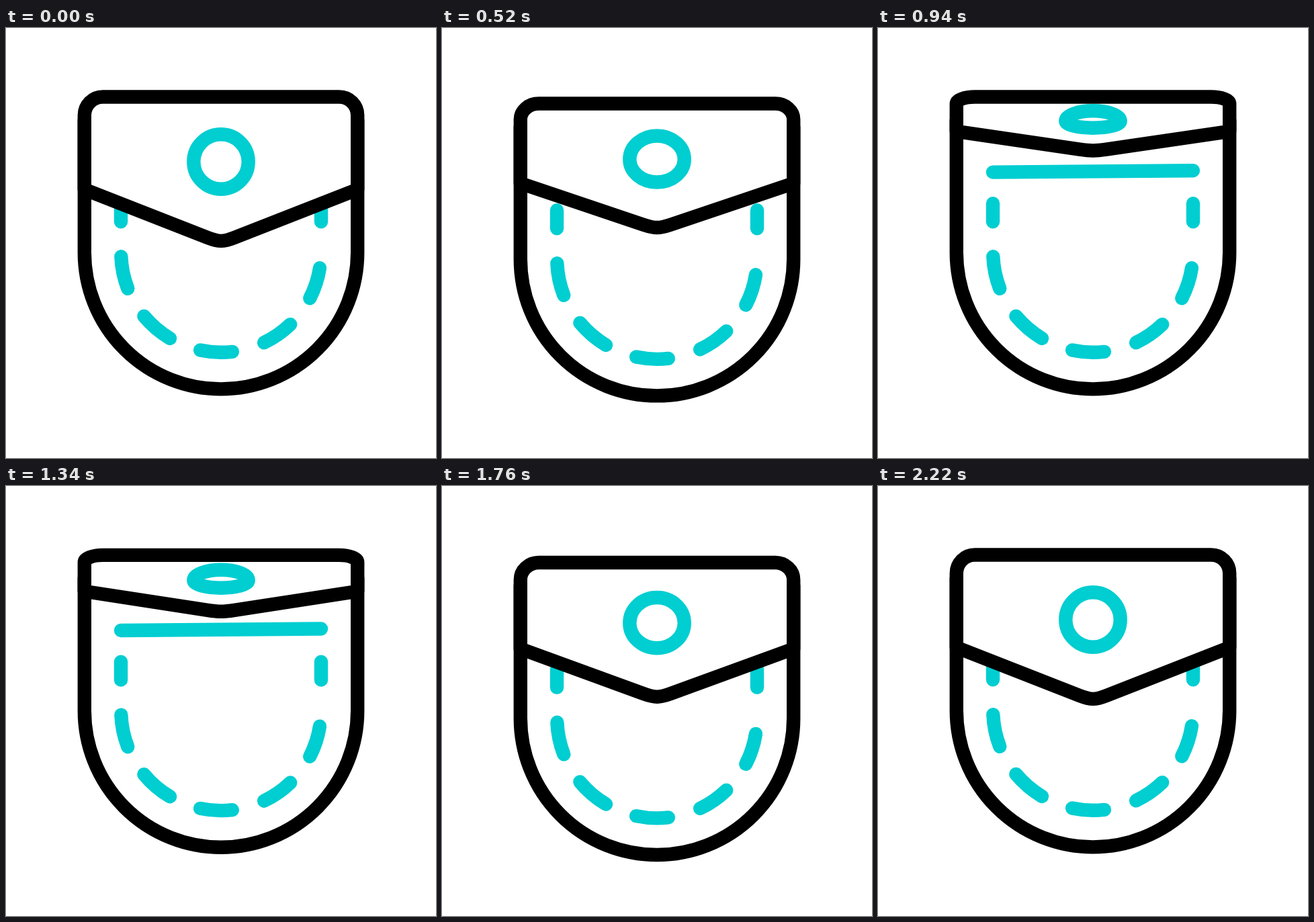
An HTML page with a canvas for the animation above (2400 ms loop, 640 by 640 pixels).

```html
<!DOCTYPE html>
<html lang="en">
<head>
<meta charset="utf-8">
<title>Pocket</title>
<style>
  html, body { margin: 0; width: 100%; height: 100%; overflow: hidden; background: #fff; }
  canvas { display: block; width: 100vmin; height: 100vmin; margin: auto; }
</style>
</head>
<body>
<canvas id="stage" width="640" height="640"></canvas>
<script>
const ctx = document.getElementById('stage').getContext('2d');
const LOOP = 2400, STEP = 20, MOVE = 940, BACK = 1280;
const TEAL = '#00ced1', BLACK = '#000';
const LEFT = 116.8, RIGHT = 523.2, TOP = 102.5, MID = 320;
const KAPPA = 0.5523;
const STITCHES = [[177.6, 158.8], [140.4, 120.7], [102, 83.5], [64.5, 46.1], [27.3, 9]];

// Eased progress of t from a to b
function ease(t, a, b) {
  const s = Math.min(1, Math.max(0, (t - a) / (b - a)));
  return s * s * (3 - 2 * s);
}

// Position on the closing move; the second half plays it backwards
function poseTime(t) {
  return t < BACK ? Math.min(t, MOVE) : Math.max(0, BACK + MOVE - t);
}

function stroke(color, trace) {
  ctx.beginPath();
  trace();
  ctx.strokeStyle = color;
  ctx.stroke();
}

function line(x1, y1, x2, y2) {
  stroke(TEAL, () => {
    ctx.moveTo(x1, y1);
    ctx.lineTo(x2, y2);
  });
}

function drawStitches() {
  line(171, 214.6, 469, 212.2);
  line(171, 261.3, 171, 288.3);
  line(469, 261.3, 469, 288.3);
  const rad = Math.PI / 180;
  for (const [from, to] of STITCHES) {
    stroke(TEAL, () => ctx.arc(MID, 334, 148.8, from * rad, to * rad, true));
  }
}

function drawBody() {
  stroke(BLACK, () => {
    ctx.moveTo(LEFT, 137);
    ctx.lineTo(LEFT, 334.2);
    ctx.arc(MID, 334.2, 203.2, Math.PI, 0, true);
    ctx.lineTo(RIGHT, 137);
  });
}

function drawFlap(k) {
  const y = d => TOP + d * k;
  const r = 27.3, c = r * (1 - KAPPA);
  stroke(BLACK, () => {
    ctx.moveTo(LEFT, y(137.7));
    ctx.lineTo(LEFT, y(r));
    ctx.bezierCurveTo(LEFT, y(c), LEFT + c, TOP, LEFT + r, TOP);
    ctx.lineTo(RIGHT - r, TOP);
    ctx.bezierCurveTo(RIGHT - c, TOP, RIGHT, y(c), RIGHT, y(r));
    ctx.lineTo(RIGHT, y(137.7));
    ctx.lineTo(340, y(209.5));
    ctx.bezierCurveTo(323.5, y(216), 316.5, y(216), 300, y(209.5));
    ctx.closePath();
    ctx.fillStyle = '#fff';
    ctx.fill();
  });
}

function drawButton(k, fold) {
  const r = 40.7, h = r * KAPPA;
  const cy = TOP + 96.5 * k;
  const up = r * k, down = r * k - 5 * fold;
  stroke(TEAL, () => {
    ctx.moveTo(MID - r, cy);
    ctx.bezierCurveTo(MID - r, cy - up * KAPPA, MID - h, cy - up, MID, cy - up);
    ctx.bezierCurveTo(MID + h, cy - up, MID + r, cy - up * KAPPA, MID + r, cy);
    ctx.bezierCurveTo(MID + r, cy + down * KAPPA, MID + h, cy + down, MID, cy + down);
    ctx.bezierCurveTo(MID - h, cy + down, MID - r, cy + down * KAPPA, MID - r, cy);
    ctx.closePath();
  });
}

function draw(t) {
  const p = poseTime(t);
  const drop = 13.35 * (ease(p, 0, 317) - ease(p, 317, MOVE));
  const fold = ease(p, 335, 942);
  const k = 1 - 0.627 * fold;

  ctx.setTransform(1, 0, 0, 1, 0, 0);
  ctx.fillStyle = '#fff';
  ctx.fillRect(0, 0, 640, 640);
  ctx.translate(0, drop);
  ctx.lineWidth = 20.4;
  ctx.lineCap = ctx.lineJoin = 'round';
  drawStitches();
  drawBody();
  drawFlap(k);
  drawButton(k, fold);
}

const start = performance.now();
function tick() {
  const t = (performance.now() - start) % LOOP;
  draw(Math.floor(t / STEP) * STEP);
  requestAnimationFrame(tick);
}
tick();
</script>
</body>
</html>
```
